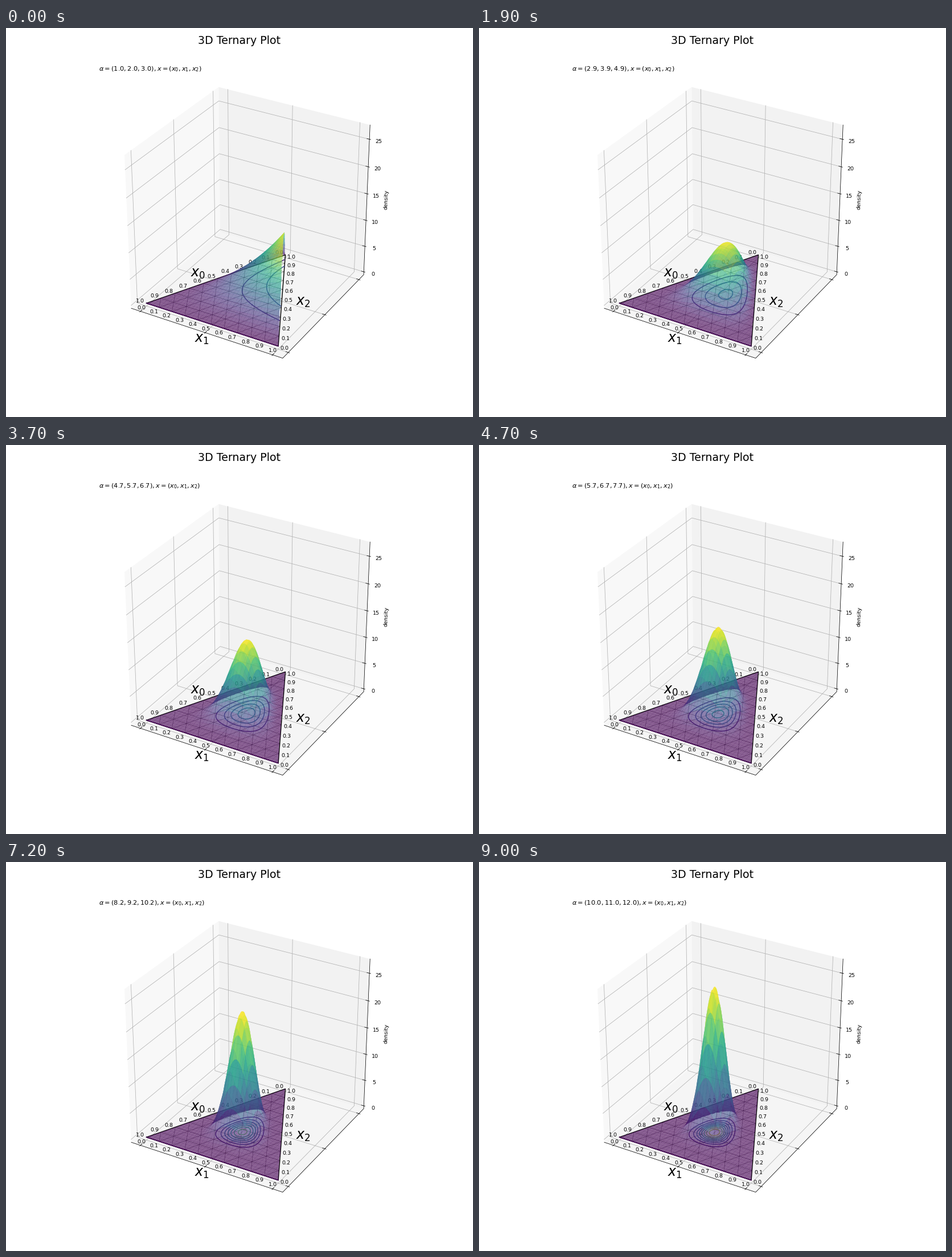
A matplotlib script for the animation above (9100 ms loop, 820x683 px).

```python
import math

import matplotlib.pyplot as plt
import numpy as np
from matplotlib.animation import FuncAnimation
from matplotlib.collections import PolyCollection
from matplotlib.colors import Normalize
from matplotlib.tri import Triangulation

W, H, DPI = 820, 683, 205 / 3
FRAMES, INTERVAL = 91, 100
ZMAX = 27
STEP, STRIDE = 0.005, 5     # sampling of the surface, samples per patch
FLOOR_N = 60                # divisions per side for the contour mesh

# camera
ELEV, AZIM, DIST = math.radians(30), math.radians(-60), 10
CX, CY, SCALE = 427.5, 332.8, 2789
SIDE = 1.0563
LO, HI = 0.5 - 0.55 * 25 / 24, 0.5 + 0.55 * 25 / 24
ZLO, ZHI = -ZMAX / 48, ZMAX * 49 / 48


def project(x, y, z):
    """Data coordinates to pixel x, pixel y and distance from the eye."""
    x = (np.asarray(x, float) - 0.5) * SIDE / 1.1
    y = (np.asarray(y, float) - 0.5) * SIDE / 1.1
    z = (np.asarray(z, float) / ZMAX - 0.5) * SIDE
    ca, sa = math.cos(AZIM), math.sin(AZIM)
    ce, se = math.cos(ELEV), math.sin(ELEV)
    flat = ca * x + sa * y
    d = DIST - (ce * flat + se * z)
    right = -sa * x + ca * y
    up = ce * z - se * flat
    return CX + SCALE * right / d, CY - SCALE * up / d, d


fig = plt.figure(figsize=((W + 0.01) / DPI, (H + 0.01) / DPI), dpi=DPI,
                 facecolor="white")
ax = fig.add_axes([0, 0, 1, 1])
ax.set_xlim(0, W)
ax.set_ylim(H, 0)
ax.axis("off")


def line(points, color="black", lw=0.8, zorder=1.2, ls="-"):
    px, py, _ = project(*np.array(points, float).T)
    ax.plot(px, py, color=color, lw=lw, ls=ls, zorder=zorder)


def pane(points, color):
    px, py, _ = project(*np.array(points, float).T)
    ax.fill(px, py, color=color, lw=0, zorder=0)


def label(x, y, s, size=10, va="center_baseline", **kw):
    return ax.text(x, y, s, fontsize=size, ha=kw.pop("ha", "center"), va=va,
                   color="black", zorder=3, **kw)


def draw_box():
    pane([(LO, LO, ZLO), (LO, HI, ZLO), (LO, HI, ZHI), (LO, LO, ZHI)], "#f8f8f8")
    pane([(LO, HI, ZLO), (HI, HI, ZLO), (HI, HI, ZHI), (LO, HI, ZHI)], "#f2f2f2")
    pane([(LO, LO, ZLO), (HI, LO, ZLO), (HI, HI, ZLO), (LO, HI, ZLO)], "#f5f5f5")

    line([(LO, LO, ZLO), (HI, LO, ZLO), (HI, HI, ZLO), (HI, HI, ZHI)])

    grid = dict(color="#b0b0b0", zorder=1)
    out, into = 1.1 / 120, 1.1 / 60
    for t in (0, 0.5, 1):
        line([(t, LO, ZLO), (t, HI, ZLO), (t, HI, ZHI)], **grid)
        line([(HI, t, ZLO), (LO, t, ZLO), (LO, t, ZHI)], **grid)
        line([(t, LO - out, ZLO), (t, LO + into, ZLO)])
        line([(HI + out, t, ZLO), (HI - into, t, ZLO)])
    for z in range(0, ZMAX, 5):
        line([(LO, LO, z), (LO, HI, z), (HI, HI, z)], **grid)
        line([(HI + out, HI, z), (HI - into, HI, z)])
        px, py, _ = project(HI, HI, z)
        label(px + 16, py + 3, str(z))
    label(668, 301, "density", va="center", rotation=87.6)


def draw_triangle():
    a, b, c = np.array([(0, 0, 0), (1, 0, 0), (0.5, 1, 0)], float)
    line([a, b, c, a], lw=1.5, zorder=2)
    line([a, b], color="#440154", lw=1.5, zorder=4)
    sides = [(c, a, b, -11, -4.4), (a, b, c, -9.2, 7), (b, c, a, 11.2, 3)]
    for start, end, other, dx, dy in sides:
        for t in np.arange(11) / 10:
            point = start + (end - start) * t
            px, py, _ = project(*point)
            label(px + dx, py + dy, f"{t:.1f}")
            if 0 < t < 1:
                line([point, other + (end - other) * t], lw=0.5, ls="--", zorder=2)
    for i, pos in enumerate([(337, 431.2), (343.5, 546.2), (521.5, 481.2)]):
        label(*pos, f"$x_{i}$", size=25, va="center")


def barycentric(x, y):
    return np.column_stack([1 - x - y / 2, x - y / 2, y])


def patches():
    """Outlines of the square patches, cut off at the triangle's sides."""
    side = np.arange(STRIDE)
    full = np.full(STRIDE, STRIDE)
    u = np.concatenate([side, full, full - side, 0 * side])
    v = np.concatenate([0 * side, side, full, full - side])
    corners = np.arange(0, round(1 / STEP), STRIDE)
    outlines = []
    for row in corners:
        for col in corners:
            x, y = (col + u) * STEP, (row + v) * STEP * 2 / math.sqrt(3)
            inside = (barycentric(x, y) > -1e-9).all(axis=1)
            if inside.sum() > 2:
                outlines.append(np.column_stack([x, y])[inside])
    return outlines


def floor_mesh():
    n = FLOOR_N
    y = np.concatenate([np.full(n + 1 - j, j / n) for j in range(n + 1)])
    x = np.concatenate([np.arange(n + 1 - j) / n + j / n / 2 for j in range(n + 1)])
    tris = Triangulation(x, y).triangles
    return barycentric(x, y), Triangulation(*project(x, y, 0 * x)[:2], tris)


def dirichlet(bary, alpha):
    log_norm = math.lgamma(sum(alpha)) - sum(math.lgamma(a) for a in alpha)
    powers = np.clip(bary, 0, 1) ** (np.array(alpha) - 1)
    return math.exp(log_norm) * np.prod(powers, axis=1)


draw_box()
draw_triangle()
label(W / 2, 0.02 * H - 1, "3D Ternary Plot", size=20, va="top")
caption = label(162.5, 75.4, "", size=12, ha="left", va="baseline")

outlines = patches()
sizes = np.array([len(p) for p in outlines])
starts = np.cumsum(sizes) - sizes
surf_x, surf_y = np.concatenate(outlines).T
surf_bary = barycentric(surf_x, surf_y)
floor_bary, floor = floor_mesh()
viridis = plt.get_cmap("viridis")

surface = PolyCollection([], linewidths=0.2, zorder=5)
ax.add_collection(surface, autolim=False)
rings = []


def patch_mean(values):
    return np.add.reduceat(values, starts) / sizes


def update(k):
    alpha = [a + k / 10 for a in (1, 2, 3)]
    caption.set_text(r"$\alpha = (%.1f, %.1f, %.1f), x = (x_0, x_1, x_2)$"
                     % tuple(alpha))

    z = dirichlet(surf_bary, alpha)
    px, py, d = project(surf_x, surf_y, z)
    order = np.argsort(-patch_mean(d))
    height = patch_mean(z)[order]
    colors = viridis(Normalize(height.min(), height.max())(height))
    colors[:, 3] = 0.6
    polys = np.split(np.column_stack([px, py]), starts[1:])
    surface.set_verts([polys[i] for i in order])
    surface.set_facecolor(colors)
    surface.set_edgecolor(colors)

    while rings:
        rings.pop().remove()
    ring = ax.tricontour(floor, dirichlet(floor_bary, alpha),
                         levels=np.arange(3, ZMAX, 3), cmap=viridis,
                         norm=Normalize(0, ZMAX), linewidths=1.5)
    ring.set_zorder(4)
    rings.append(ring)
    return surface, caption


anim = FuncAnimation(fig, update, frames=FRAMES, interval=INTERVAL,
                     init_func=lambda: (surface, caption), blit=False)
plt.show()
```
